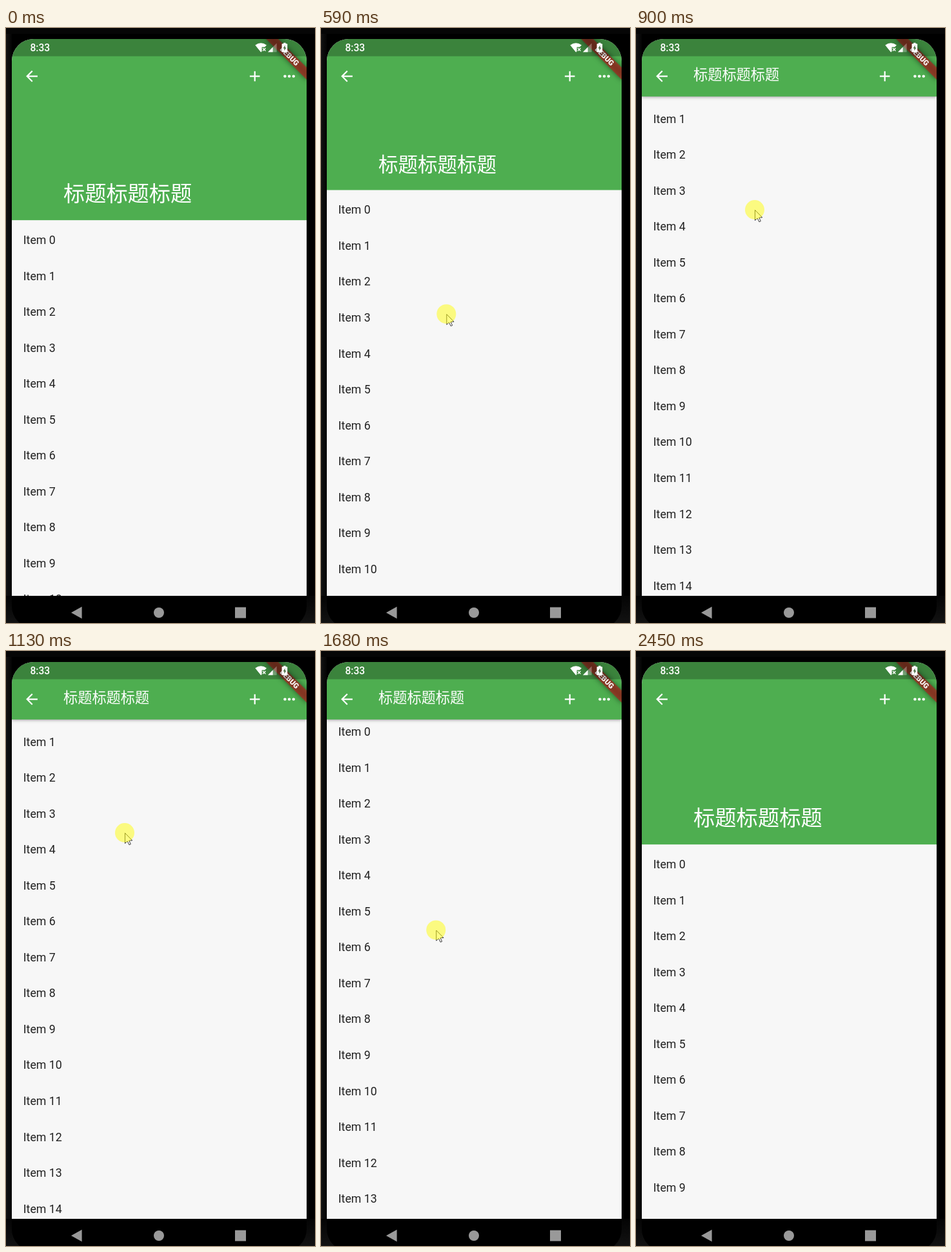
Animation of 479 by 920 pixels, one loop 2.84 s. Source, as an HTML page with a canvas:

```html
<!DOCTYPE html>
<html lang="zh-CN">
<head>
<meta charset="utf-8">
<title>Collapsing header</title>
<style>
html, body { margin: 0; width: 100%; height: 100%; overflow: hidden; background: #000; }
canvas { display: block; width: 479px; height: 920px; }
</style>
</head>
<body>
<canvas id="stage"></canvas>
<script>
const W = 479, H = 920, LOOP = 2840;
const STEP = 76.8, LEAD = 29;
const DP = 457 / 411.4;
const LEFT = 9, TOP = 17, WIDTH = 457, BOTTOM = 878, RADIUS = 34;
const BAR = TOP + 24 * DP;
const MAX = BAR + 230 * DP, MIN = BAR + 56 * DP;
const ROW = 50 * DP;
const GREEN = '#4eae50';

const canvas = document.getElementById('stage');
const ctx = canvas.getContext('2d');
const dpr = window.devicePixelRatio || 1;
canvas.width = W * dpr;
canvas.height = H * dpr;

// motion

const span = (t, a, b) => Math.min(1, Math.max(0, (t - a) / (b - a)));
const smooth = u => u * u * (3 - 2 * u);
const easeIn = u => u * u;
const easeOut = u => 1 - (1 - u) ** 3;
const mix = (a, b, k) => a + (b - a) * k;

function scrollAt(t) {
  const up = smooth(span(t, 471, 879));
  const down = smooth(span(t, 1609, 1810));
  return mix(mix(2, 245, up), 0, down);
}

function pointerAt(t) {
  const enter = easeOut(span(t, 0, 379));
  const up = span(t, 379, 873);
  const down = span(t, 1477, 1896);
  const leave = smooth(span(t, 1960, 2360));
  if (t < 379) return [mix(310, 196.5, enter), mix(860, 540, enter)];
  if (t < 1477) return [mix(196.5, 184, easeIn(up)), mix(540, 281, smooth(up))];
  if (t < 1960) return [mix(184, 177, easeOut(down)), mix(281, 650, smooth(down))];
  return [mix(177, 351, leave), mix(650, 889, leave)];
}

const glowAt = t => span(t, 1737, 1814) * (1 - span(t, 1990, 2420));

// drawing helpers

function rect(x, y, w, h, color) {
  ctx.fillStyle = color;
  ctx.fillRect(x, y, w, h);
}

function rounded(x, y, w, h, r, color) {
  ctx.fillStyle = color;
  ctx.beginPath();
  ctx.roundRect(x, y, w, h, r);
  ctx.fill();
}

function disc(x, y, r, color) {
  ctx.fillStyle = color;
  ctx.beginPath();
  ctx.arc(x, y, r, 0, Math.PI * 2);
  ctx.fill();
}

function poly(points, color) {
  ctx.fillStyle = color;
  ctx.beginPath();
  for (let i = 0; i < points.length; i += 2) ctx.lineTo(points[i], points[i + 1]);
  ctx.closePath();
  ctx.fill();
}

function label(str, x, y, font, color) {
  ctx.font = font;
  ctx.fillStyle = color;
  ctx.fillText(str, x, y);
}

function fade(x0, y0, x1, y1, from, to) {
  const g = ctx.createLinearGradient(x0, y0, x1, y1);
  g.addColorStop(0, from);
  g.addColorStop(1, to);
  return g;
}

function clipped(x, y, w, h, r, draw) {
  ctx.save();
  ctx.beginPath();
  ctx.roundRect(x, y, w, h, r);
  ctx.clip();
  draw();
  ctx.restore();
}

// scene

function drawCase() {
  rect(0, 0, W, H, '#000');
  rect(0, 0, W, 9, '#060606');
  rect(0, 9, 9, H - 9, fade(0, 0, 9, 0, '#121212', '#040404'));
  rect(0, BOTTOM, W, H - BOTTOM, fade(0, BOTTOM, 0, H, '#040404', '#121212'));
  rounded(LEFT, TOP, WIDTH, 911, RADIUS, '#000');
}

function drawItems(scroll, from, to) {
  clipped(LEFT, from, WIDTH, to - from, 0, () => {
    for (let i = 0; i < 16; i++) {
      label('Item ' + i, LEFT + 16 * DP, 336 - scroll + i * ROW,
        16 * DP + 'px Roboto, sans-serif', '#222');
    }
  });
}

function drawHeader(scroll) {
  const edge = Math.max(MIN, MAX - scroll);
  ctx.save();
  if (MAX - scroll < MIN) {
    ctx.shadowColor = 'rgba(0,0,0,.42)';
    ctx.shadowBlur = 5 * dpr;
    ctx.shadowOffsetY = 1.5 * dpr;
  }
  rect(LEFT, TOP, WIDTH, edge - TOP, GREEN);
  ctx.restore();

  const zoom = 1 + 0.5 * (edge - MIN) / (MAX - MIN);
  label('标题标题标题', LEFT + 72 * DP, edge - 16 * DP - 7.7 * zoom,
    20 * DP * zoom + 'px "Noto Sans CJK SC", "Noto Sans CJK", "Noto Sans CJK JP", sans-serif', '#fff');

  const y = 74.6;
  ctx.save();
  ctx.translate(40, y);
  ctx.scale(DP, DP);
  poly([8, -1, -4.2, -1, 1.4, -6.6, 0, -8, -8, 0, 0, 8, 1.4, 6.6, -4.2, 1, 8, 1], '#fff');
  ctx.restore();
  rect(385.7 - 7 * DP, y - DP, 14 * DP, 2 * DP, '#fff');
  rect(385.7 - DP, y - 7 * DP, 2 * DP, 14 * DP, '#fff');
  for (let i = -1; i < 2; i++) disc(439.1 + i * 6 * DP, y, 2 * DP, '#fff');
}

function drawGlow(power) {
  const r = WIDTH * 1.5;
  clipped(LEFT, TOP, WIDTH, 110, 0, () => {
    ctx.translate(LEFT + WIDTH / 2, TOP);
    ctx.scale(1, 0.4 + 0.4 * power);
    disc(0, WIDTH * 0.2 - r, r, `rgba(33,150,243,${0.03 * power})`);
  });
}

function drawBanner() {
  const strip = [-40 * DP, 28 * DP, 80 * DP, 12 * DP];
  ctx.save();
  ctx.translate(LEFT + WIDTH, TOP);
  ctx.rotate(Math.PI / 4);
  ctx.filter = 'blur(4px)';
  rect(...strip, 'rgba(0,0,0,.5)');
  ctx.filter = 'none';
  rect(...strip, 'rgba(183,28,28,.63)');
  ctx.textAlign = 'center';
  label('DEBUG', 0, 34 * DP + 3.6, '900 ' + 10.2 * DP + 'px Roboto, sans-serif', '#fff');
  ctx.restore();
}

function drawStatus() {
  rect(LEFT, TOP, WIDTH, BAR - TOP, 'rgba(0,0,0,.25)');
  label('8:33', 37.4, 36, '500 15.6px Roboto, sans-serif', '#fff');

  // wifi with a small cross
  ctx.fillStyle = ctx.strokeStyle = '#fff';
  ctx.beginPath();
  ctx.moveTo(386.3, 26.6);
  ctx.quadraticCurveTo(395.2, 20, 404, 26.6);
  ctx.lineTo(401, 29.6);
  ctx.lineTo(396.6, 29.6);
  ctx.lineTo(396.6, 36);
  ctx.lineTo(395.2, 37.4);
  ctx.fill();
  ctx.lineWidth = 1.4;
  ctx.beginPath();
  ctx.moveTo(398, 31);
  ctx.lineTo(402.4, 35.4);
  ctx.moveTo(402.4, 31);
  ctx.lineTo(398, 35.4);
  ctx.stroke();

  // mobile signal
  poly([406, 37.2, 419.6, 37.2, 419.6, 23.6], 'rgba(255,255,255,.3)');
  poly([406, 37.2, 413.6, 37.2, 413.6, 29.6], '#fff');

  // charging battery
  rounded(427.6, 24.2, 8.6, 13.4, 1, '#fff');
  rect(430.2, 22.8, 3.4, 2, '#fff');
  poly([432.6, 26.4, 429.6, 31.6, 431.4, 31.6, 431.4, 35.2, 434.4, 30.2, 432.6, 30.2], '#4a6a40');
}

function drawNav() {
  const gray = '#999';
  poly([101, 904, 117.6, 894.8, 117.6, 913.2], gray);
  disc(237, 904, 8, gray);
  rect(355, 895.6, 17, 16.8, gray);
}

function drawPointer(x, y) {
  ctx.save();
  ctx.translate(x + 0.5, y + 0.5);
  poly([0, 0, 0, 16, 3.7, 12.5, 6.4, 18.2, 8.8, 17.2, 6.2, 11.5, 11.2, 11.5], '#fff');
  ctx.strokeStyle = '#222';
  ctx.lineWidth = 0.9;
  ctx.stroke();
  ctx.restore();
  disc(x, y, 15, 'rgba(255,253,10,.5)');
}

function draw(t) {
  ctx.setTransform(dpr, 0, 0, dpr, 0, 0);
  const scroll = scrollAt(t);
  // the lower part of the screen tears during a fast upward swipe
  const lag = scroll - scrollAt(t - 11);
  const tear = lag > 8 ? lag : 0;

  drawCase();
  clipped(LEFT, TOP, WIDTH, BOTTOM - TOP, [RADIUS, RADIUS, 0, 0], () => {
    rect(LEFT, TOP, WIDTH, BOTTOM - TOP, '#f7f7f7');
    drawItems(scroll, TOP, 460);
    drawItems(scroll - tear, 460, BOTTOM);
    drawHeader(scroll);
    drawGlow(glowAt(t));
    drawBanner();
    drawStatus();
  });
  drawNav();
  if (t > 0 && t < 2400) drawPointer(...pointerAt(t));
}

const start = performance.now();
function loop() {
  const now = (performance.now() - start) % LOOP;
  draw(Math.floor((now + LEAD) / STEP) * STEP - LEAD);
  requestAnimationFrame(loop);
}
loop();
</script>
</body>
</html>
```
